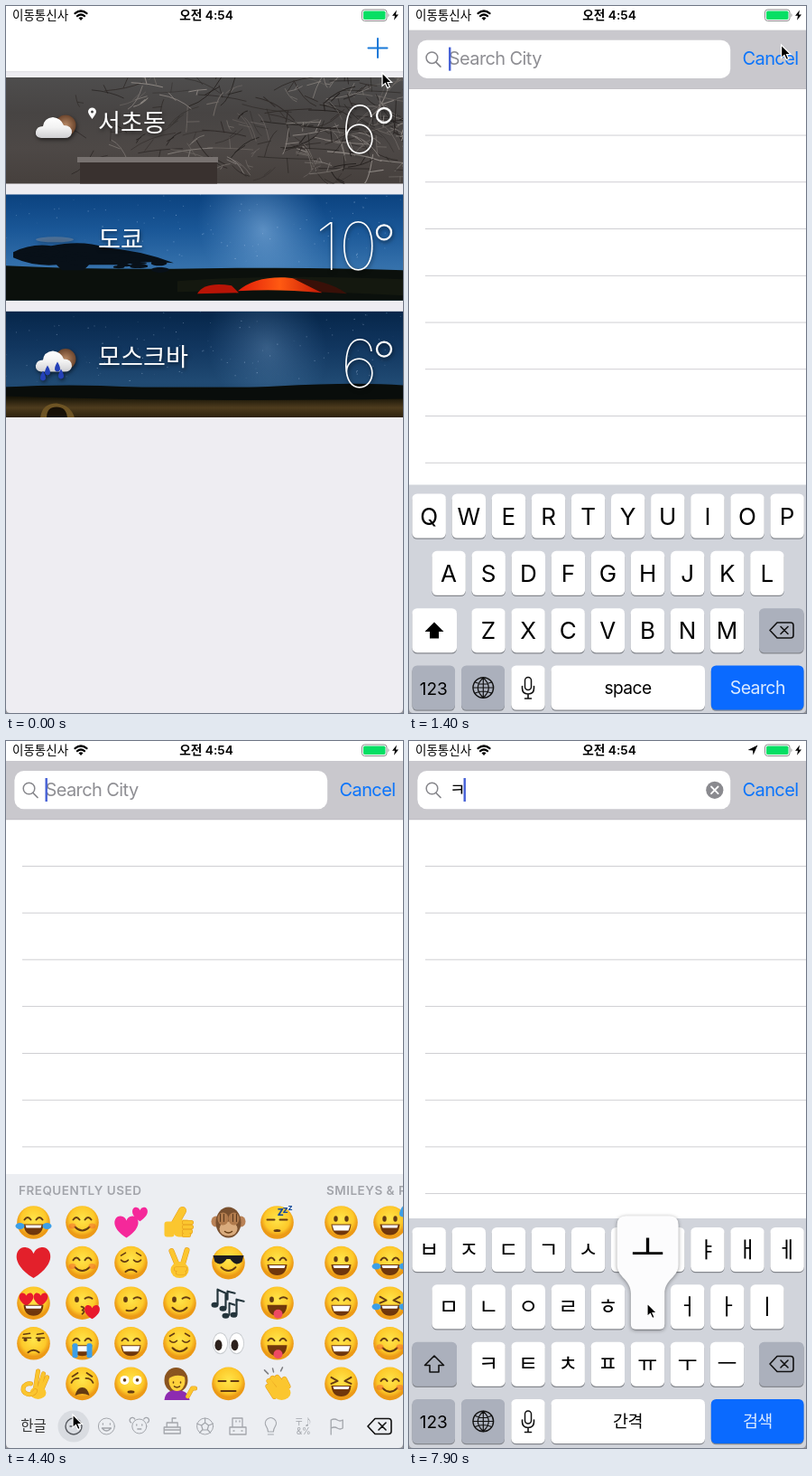
Write an HTML page that moves like this. It is 440 px wide and 782 px high and loops after 8000 ms.

```html
<!DOCTYPE html>
<html lang="ko">
<head>
<meta charset="utf-8">
<title>City search</title>
<style>
html, body { margin: 0; width: 100%; height: 100%; overflow: hidden; background: #fff; }
svg { display: block; width: 440px; height: 782px; font-family: Inter, 'Noto Sans CJK KR', 'Noto Sans CJK', sans-serif; }
.ko { font-family: 'Noto Sans CJK KR', 'Noto Sans CJK', sans-serif; }
.mid { text-anchor: middle; }
.tight { letter-spacing: -.6px; }
.line { fill: none; stroke-linecap: round; stroke-linejoin: round; }
.soft { filter: drop-shadow(1px 2px 2px rgba(0,0,0,.55)); }
</style>
</head>
<body>
<svg id="stage" viewBox="0 0 440 782" xmlns="http://www.w3.org/2000/svg"></svg>
<script>
let seed = 7;
const rnd = () => (seed = seed * 16807 % 2147483647) / 2147483647;
const times = (n, f) => Array.from({ length: n }, (_, i) => f(i)).join('');
const at = (x, y, s, k = 1) => `<g transform="translate(${x} ${y}) scale(${k})">${s}</g>`;
const text = (x, y, size, s, more = '') => `<text x="${x}" y="${y}" font-size="${size}" ${more}>${s}</text>`;
const rect = (x, y, w, h, fill, r = 0) => `<rect x="${x}" y="${y}" width="${w}" height="${h}" rx="${r}" fill="${fill}"/>`;
const oval = (x, y, rx, ry, fill) => `<ellipse cx="${x}" cy="${y}" rx="${rx}" ry="${ry}" fill="${fill}"/>`;
const shape = (d, fill) => `<path d="${d}" fill="${fill}"/>`;
const line = (d, color, w = 1) => `<path class="line" d="${d}" stroke="${color}" stroke-width="${w}"/>`;
const fade = (id, dir, ...stops) => `<linearGradient id="${id}" ${dir}>${stops.map((c, i) =>
  `<stop offset="${i / (stops.length - 1)}" stop-color="${c}"/>`).join('')}</linearGradient>`;
const down = 'x1="0" y1="0" x2="0" y2="1"';

const defs = `<defs>
${fade('mist', down, '#4e4d4d', '#474443', '#4d4846', '#46403d')}
${fade('dusk', down, '#0b427f', '#1a5797', '#3470ab', '#4a7ea6')}
${fade('night', down, '#06264a', '#11365f', '#204a73', '#1c3c58')}
${fade('field', down, '#0a0e0c', '#171407', '#4e3c1e', '#2c210d')}
${fade('tent', 'x1="0" y1="0" x2="1" y2="0"', '#e01a08', '#ff5a12', '#c41706')}
<radialGradient id="haze"><stop stop-color="#9cc6ee" stop-opacity=".5"/><stop offset="1" stop-color="#6fa5da" stop-opacity="0"/></radialGradient>
<radialGradient id="moon"><stop stop-color="#b98a66"/><stop offset="1" stop-color="#6b452d"/></radialGradient>
<radialGradient id="face" cy=".4"><stop stop-color="#ffe54a"/><stop offset=".75" stop-color="#fdc92a"/><stop offset="1" stop-color="#ec9a17"/></radialGradient>
${fade('cloud', down, '#fff', '#f2f2f2', '#cfcfd2')}
<clipPath id="card"><rect width="440" height="117.5"/></clipPath>
</defs>`;

// Weather list
const stars = times(120, () => oval(rnd() * 440, rnd() * 78, .6, .6, `rgba(210,230,255,${rnd() * .45})`));
const bark = ['#262220', '#312c2a', '#6f6965', '#8b8580'];
const twigs = times(170, i => {
  const x = 440 * (1 - rnd() * rnd()), y = rnd() * 110, a = rnd() * 6.3, len = 15 + rnd() * 50;
  const dx = Math.cos(a) * len, dy = Math.sin(a) * len * .6;
  return line(`M${x} ${y}q${dx * .4} ${dy * .8} ${dx} ${dy}m${-dx / 2} ${-dy * .4}l${dy * .5} ${dx * .25}`, bark[i % 4], .5 + rnd() * .6);
});
const leaves = times(50, () => {
  const x = rnd();
  return oval(14 + x * 160, 58 + x * 14 + rnd() * 14, 4 + rnd() * 7, 1 + rnd() * 2, '#081018');
});
const photos = [
  rect(0, 0, 440, 118, 'url(#mist)') + twigs + rect(82, 92, 152, 26, '#39312f') + rect(79, 88, 156, 6, '#787270'),
  rect(0, 0, 440, 118, 'url(#dusk)') + `<g transform="rotate(-25 290 45)">${oval(288, 38, 70, 85, 'url(#haze)')}</g>` + stars +
    shape('M0 79Q100 84 220 82T440 84V118H0Z', '#0b100c') + shape('M190 96Q300 88 440 94V112Q300 104 190 108Z', '#14180f') +
    shape('M8 64Q28 54 50 57Q85 50 110 59Q150 62 186 76Q150 73 130 78H92L86 84H62L56 78Q30 80 8 70Z', '#081018') + leaves +
    shape('M212 110Q220 96 250 101L258 109Z', '#b81406') + shape('M257 107Q275 91 309 92Q340 94 350 109Q300 104 257 107Z', 'url(#tent)') +
    shape('M318 93Q356 94 378 110L348 108Z', '#391008'),
  rect(0, 0, 440, 118, 'url(#night)') + `<g transform="rotate(-25 300 40)" opacity=".55">${oval(290, 36, 65, 75, 'url(#haze)')}</g>` + stars +
    rect(0, 84, 440, 34, 'url(#field)') + shape('M0 84Q70 80 140 84T300 83T440 82V97Q200 101 0 94Z', '#090d0b') +
    shape('M38 118Q40 102 56 102Q72 104 76 118Z', '#6e5424') + shape('M45 118Q45 106 56 106Q67 106 68 118Z', '#171006')
];
const cloud = oval(66, 53, 11.5, 11.5, 'url(#moon)') +
  shape('M39 67Q32 66 33 60Q34 54 41 54Q42 45 52 44Q61 45 64 53Q73 53 73 61Q72 67 65 67Z', 'url(#cloud)');
const drop = (x, y) => shape(`M${x} ${y}q-6 10 0 11q6 -1 0 -11z`, '#2441b8');
const icons = [cloud, oval(54, 50, 21, 3, 'rgba(150,150,155,.4)'),
  cloud + drop(46, 60) + drop(57, 56) + drop(41, 66) + drop(61, 64)];
const cities = [['서초동', '6'], ['도쿄', '10'], ['모스크바', '6']];
const list = rect(0, 0, 440, 782, '#eeedf2') + rect(0, 0, 440, 72.5, '#fff') + rect(0, 72.5, 440, .7, '#d5d4d9') +
  `<g id="plus">${line('M401.5 46.5h21M412 36v21', '#1878d8', 2)}</g>` +
  cities.map(([name, deg], i) => at(0, 79 + i * 129.3, `<g clip-path="url(#card)">${photos[i]}
    <g class="soft" fill="#fff">${icons[i]}${text(102, 60, 27.2, name, 'class="ko" font-weight="300"')}
    ${text(411, 84, 73, deg, 'text-anchor="end" font-weight="100" letter-spacing="-1"')}
    <circle cx="419" cy="42" r="8" fill="none" stroke="#fff" stroke-width="2.3"/></g></g>`)).join('') +
  shape('M95.500 125Q91 119 91 117A4.500 4.500 0 0 1 100 117Q100 119 95.500 125Z', '#fff') + oval(95.5, 117, 1.5, 1.5, '#444');

// Search sheet
const sheet = rect(0, -2, 440, 784, '#fff') + rect(0, 22, 440, 65, '#c9c8cd') + rect(0, 86.5, 440, .7, '#b9b8bd') +
  rect(9.4, 33, 346.8, 42.3, '#fff', 10.5) +
  `<g id="lens">${line('M30 57.5l5 5', '#86868b', 1.7)}<circle cx="25.500" cy="52.500" r="6.300" fill="none" stroke="#86868b" stroke-width="1.500"/></g>` +
  text(43.5, 60.5, 20, 'Search City', 'id="hint" class="tight" fill="#8e8e93"') +
  text(45, 60.5, 19, 'ㅋ', 'id="typed" class="ko" fill="#000"') +
  `<rect id="caret" x="43.500" y="41" width="2.400" height="26" fill="#4560d6"/>` +
  `<g id="clear">${oval(338.8, 54.3, 9.6, 9.6, '#8a8a8f')}${line('M335 50.500l7.600 7.600m0-7.600l-7.600 7.600', '#fff', 1.8)}</g>` +
  text(369.5, 60.5, 20, 'Cancel', 'class="tight" fill="#0a74fb"') +
  times(12, i => rect(18, 138 + i * 51.75, 422, .8, '#c4c3c8'));

// Letter keyboards
const rowY = [538, 601.3, 664.7, 728], rowX = [3.5, 25.4, 69.3], pitch = 44.1, keyW = 37.4;
const gray = '#abb0bc';
const key = (x, y, w, fill = '#fff', id = '') =>
  rect(x, y + 1.3, w, 49, '#85888e', 5.5) + `<rect ${id} x="${x}" y="${y}" width="${w}" height="49" rx="5.500" fill="${fill}"/>`;
const erase = (x, y) => line(`M${x - 13} ${y}l8-8.500h15q3 0 3 3v11q0 3-3 3h-15zM${x - 1} ${y - 4}l8 8m0-8l-8 8`, '#111', 1.6);
const shiftArrow = 'M28 680l-10.500 10.500h5.500v7.500h10v-7.500h5.500z';
const globe = at(82.3, 752.5, '<circle r="11.300" class="line" stroke="#111" stroke-width="1.400"/>' +
  line('M-11 0H11M0-11V11M0-11Q-12 0 0 11M0-11Q12 0 0 11M-9-6Q0-2 9-6M-9 6Q0 2 9 6', '#111', 1.2));
const mic = line('M125.500 751v2q0 6.500 6.500 6.500t6.500-6.500v-2M132 760v4.500m-3.500 0h7', '#111', 1.6) +
  '<rect x="128.500" y="741" width="7" height="14" rx="3.500" fill="none" stroke="#111" stroke-width="1.500"/>';
function board(rows, korean) {
  const font = korean ? 'class="ko mid"' : 'class="mid"', size = korean ? 24 : 26;
  const keys = rows.map((row, r) => [...row].map((c, i) => {
    const x = rowX[r] + i * pitch;
    return key(x, rowY[r], keyW) + text(x + keyW / 2, rowY[r] + (korean ? 32.5 : 34), size, c, font);
  }).join('')).join('');
  const [space, search] = korean ? ['간격', '검색'] : ['space', 'Search'];
  return rect(0, 528, 440, 254, '#d1d4db') + keys +
    key(3.5, rowY[2], 49.5, korean ? gray : '#fff') + (korean ? line(shiftArrow, '#111', 1.6) : shape(shiftArrow, '#000')) +
    key(388, rowY[2], 49.5, gray) + erase(413, 689) +
    key(3.5, 728, 47.5, gray) + text(27.3, 760, 19, '123', 'class="mid"') +
    key(58, 728, 48, gray, korean ? '' : 'id="globeKey"') + globe + key(113.3, 728, keyW) + mic +
    key(157.5, 728, 170.5) + text(242.5, 759, korean ? 18.5 : 19.2, space, 'class="mid tight"') +
    key(334.8, 728, 102.7, '#0a6aff') + text(386.3, 759, korean ? 18.5 : 19.5, search, 'class="mid tight" fill="#dcebff"');
}
const latin = ['QWERTYUIOP', 'ASDFGHJKL', 'ZXCVBNM'];
const hangul = ['ㅂㅈㄷㄱㅅㅛㅕㅑㅐㅔ', 'ㅁㄴㅇㄹㅎㅗㅓㅏㅣ', 'ㅋㅌㅊㅍㅠㅜㅡ'];
const bubble = (id, row, col) => `<g id="${id}">` + at(rowX[row] + col * pitch + keyW / 2, rowY[row],
  `<path style="filter:drop-shadow(0 1px 2px rgba(0,0,0,.4))" fill="#fcfcfd" d="M-34-66q0-10 10-10h48q10 0 10 10v44c0 14-15.300 16-15.300 32v34q0 5.500-5.500 5.500h-26.400q-5.500 0-5.500-5.500v-34c0-16-15.300-18-15.300-32z"/>` +
  text(0, -25, 41, hangul[row][col], 'class="ko mid"')) + '</g>';

// Emoji: a face is eyes + mouth + extras
const ink = '#643b12', skin = '#fbc62f', edge = '#e39a1c';
const heart = (c, x = 0, y = 0, k = 1) => at(x, y, shape('M0 17C-29-1-18-19-9-17Q-2-16 0-10Q2-16 9-17C18-19 29-1 0 17Z', c), k);
const eyes = {
  d: oval(-6, -4, 2.2, 3.2, ink) + oval(6, -4, 2.2, 3.2, ink),
  h: line('M-10-3q3.500-5 7 0M3-3q3.500-5 7 0', ink, 2),
  c: line('M-11-3q4 4 8 0M3-3q4 4 8 0M-11-8l5-3M11-8l-5-3', ink, 1.6),
  l: line('M-11-3h8M3-3h8', ink, 2),
  u: line('M-12-6h9M3-6h9M-11-10l7-1M4-10l7-1', ink, 1.6) + oval(-9, -4, 2, 2, ink) + oval(6, -4, 2, 2, ink),
  a: line('M-12-1q2-5 8-5M12-1q-2-5-8-5M-11-8l6-4M11-8l-6-4', ink, 1.8),
  x: line('M-11-7l7 4-7 3M11-7l-7 4 7 3', ink, 2),
  k: line('M3-5q4-3 8 0', ink, 2) + oval(-6, -4, 2.4, 3.2, ink),
  w: oval(-7, -4, 5, 5, '#fff') + oval(7, -4, 5, 5, '#fff') + oval(-7, -4, 1.8, 1.8, ink) + oval(7, -4, 1.8, 1.8, ink),
  s: shape('M-17-8H17L15-1Q8 5 2-4H-2Q-8 5-15-1Z', '#1c1c20'),
  H: heart('#e8192c', -8, -4, .42) + heart('#e8192c', 8, -4, .42)
};
const grin = shape('M-11 2H11Q10 14 0 14T-11 2Z', '#70370c');
const mouths = {
  S: line('M-8 5q8 8 16 0', ink, 2), f: line('M-8 8h16', ink, 2), n: line('M-6 10q6-5 12 0', ink, 2),
  O: grin + shape('M-9 3H9L8 6H-8Z', '#fff'), T: grin + shape('M-10 3H10L8 9H-8Z', '#fff'),
  m: line('M-5 8q7 2 11-3', ink, 2), g: oval(0, 9, 4, 1.6, ink), e: shape('M-8 13Q-6 4 0 4T8 13Q0 9-8 13Z', ink),
  t: grin + oval(1, 12, 5, 5, '#ee4a62'), p: line('M-1 4q5 1 1 4 4 1 0 4', ink, 1.8)
};
const blue = '#3c9fe8';
const extras = {
  j: oval(-15, 4, 5, 3.5, blue) + oval(15, 4, 5, 3.5, blue), o: rect(-11, 0, 6, 16, blue, 2) + rect(5, 0, 6, 16, blue, 2),
  b: oval(-11, 4, 4, 3, 'rgba(240,90,50,.45)') + oval(11, 4, 4, 3, 'rgba(240,90,50,.45)'),
  q: shape('M14-18q-7 11 0 12q7-1 0-12z', blue), v: heart('#e8192c', 11, 10, .45),
  z: [[0, -8, 13], [6, -11, 11], [12, -14, 9]].map(p => text(...p, 'z', 'fill="#174c9c" font-weight="700"')).join('')
};
const face = code => oval(0, 0, 18.3, 18.3, 'url(#face)') + eyes[code[0]] + mouths[code[1]] + [...code.slice(2)].map(c => extras[c]).join('');
const finger = (d, w = 7) => line(d, edge, w + 1) + line(d, skin, w);
const things = {
  love: heart('#e3202b'),
  pair: heart('#f5289a', -5, 5, .7) + heart('#f5289a', 10, -9, .45),
  thumb: finger('M-5 1L3-13', 8) + rect(-7, -3, 21, 19, skin, 6) + finger('M5 0H13M5 5H13M5 10H12M5 14H10', 4) + rect(-17, -1, 11, 17, skin, 3),
  peace: finger('M-2 4L-9-13M3 3L8-14', 5) + oval(0, 8, 10, 9, skin) + finger('M-4 7H6M-2 11H5', 4),
  ok: finger('M2 5L5-14M6 6L11-11M9 7L15-7', 4) + oval(5, 10, 9, 7, skin) + line('M2 8A7 6 0 1 1-3 0', edge, 5) + line('M2 8A7 6 0 1 1-3 0', skin, 4),
  clap: finger('M-10 3L-3 14M-9-3L0 9M-5-6L5 6M0-7L9 4M8-5L12 3', 5) + oval(5, 10, 10, 8, skin) + line('M-10-11l-4-4M-4-13l-1-4M4-14l2-4', '#7d7d82', 1.5),
  ape: oval(-14, -1, 5, 6, '#b98257') + oval(14, -1, 5, 6, '#b98257') + oval(0, 0, 14, 17, '#79502f') + oval(0, 7, 10, 8, '#d9ab7d') +
    oval(-6, -4, 6, 7, '#b07a4c') + oval(6, -4, 6, 7, '#b07a4c') + line('M-9-9v8M-5-9v8M5-9v8M9-9v8', '#59391f', 1) + line('M-4 10q4 3 8 0', ink, 1.5),
  notes: line('M-12 1V-15l9 4V5M-1-4V-13l8 2M9 12V-4l8 2', '#23343b', 2.2) + oval(-15, 2, 4, 3, '#23343b') + oval(-6, 6, 4, 3, '#23343b') + oval(6, 13, 4, 3, '#23343b') + oval(-3, 14, 4, 3, '#23343b') + line('M1 13V0l6 2', '#23343b', 2),
  look: [-9, 9].map(x => oval(x, 0, 8.5, 12, '#c9ccd0') + oval(x, 0, 7.6, 11, '#fff') + oval(x - 2, 2, 4, 6, '#2c211c')).join(''),
  girl: oval(-4, -4, 13, 14, '#8a5420') + shape('M-17 18Q-16 7-4 7Q10 7 11 18Z', '#8d2bb0') + oval(-3, -3, 9, 11, '#ffd23c') +
    shape('M-13-5Q-9-16 0-15Q7-13 7-7Q-4-12-13-5Z', '#8a5420') + finger('M9 14L14 5H17', 4) + line('M-7-2v1M1-2v1M-6 3q3 2 6 0', ink, 1.5)
};
const grid = `hOj hSb pair thumb ape lgz dT dOq
love hSb cn peace sS hO dO hOj
HO kpv km kS notes kt hT xOj
un hTo hT cS look ht hT hSb
ok ae wg girl lf clap xO hSb`.split('\n').map(r => r.split(' '));
const colX = i => i < 6 ? 30.5 + 54 * i : 371.5 + 54 * (i - 6);
const pale = '#a2a5ab';
const tabs = [
  '<circle r="9" class="line" stroke="#55585e" stroke-width="1.400"/>' + line('M0-5V0H-4', '#55585e', 1.4),
  '<circle r="9" class="line" stroke="#a2a5ab"/>' + line('M-4-3v1M4-3v1M-5 2q5 6 10 0z', pale, 1.3),
  '<circle r="8" class="line" stroke="#a2a5ab"/>' + line('M-9-4a3 3 0 1 1 4-4M9-4a3 3 0 1 0-4-4M-3-2v1M3-2v1M-2 3h4', pale, 1.3),
  line('M-9 8V1H9V8ZM-9 4H9M-6 1V-4H6V1M0-4V-9h4', pale, 1.3),
  '<circle r="9" class="line" stroke="#a2a5ab"/>' + line('M0-4l4 3-1.500 5h-5l-1.500-5zM0-9v5M4-1l5-2M3 4l3 3M-3 4l-3 3M-4-1l-5-2', pale, 1.2),
  line('M-6 0V-9H5V0M-9 9V1H9V9ZM-5 5h1M4 5h1M-2-6v1M2-6v1', pale, 1.3),
  line('M-3 6Q-3 3-5 0A6 6 0 1 1 5 0Q3 3 3 6ZM-3 9H3', pale, 1.2),
  text(0, -1, 10, '〒♪', `class="ko mid" fill="${pale}"`) + text(0, 9, 10, '&amp;%', `class="mid" fill="${pale}"`),
  line('M-6 9V-7Q-2-9 1-7T7-7V2Q4 4 1 2T-6 2', pale, 1.3)
];
const label = 'font-weight="600" letter-spacing=".5" fill="#a2a4aa"';
const emoji = rect(0, 479, 440, 303, '#eceef2') + text(14, 501.8, 13.5, 'FREQUENTLY USED', label) + text(355, 501.8, 13.5, 'SMILEYS &amp; PEOPLE', label) +
  grid.map((row, r) => row.map((c, i) => at(colX(i), 532.5 + 44.6 * r, things[c] || face(c))).join('')).join('') +
  text(30.5, 763, 15.5, '한글', 'class="ko mid" fill="#333"') + oval(75, 758, 17.5, 17.5, '#d9dce1') +
  tabs.map((s, i) => at(75 + 36.4 * i, 758, s)).join('') + erase(414, 758);

// Status bar and pointer
const status = rect(0, 0, 440, 22, '#fff') + text(7, 14.5, 13.5, '이동통신사', 'class="ko"') +
  line('M76.500 8.200q6.500-5.400 13 0M79 11.200q4-3.400 8 0', '#000', 2.2) + shape('M83 16l-2.500-2.800q2.500-1.700 5 0z', '#000') +
  text(222, 14.5, 13.7, '오전 4:54', 'class="mid" font-weight="600"') +
  `<g id="locate">${shape('M386.500 4.500L381.500 15.500L381 10.500L375.500 10Z', '#000')}</g>` +
  '<rect x="394.500" y="4" width="27.500" height="12.500" rx="3" fill="none" stroke="#8b8b8b"/>' + rect(396, 5.6, 24.5, 9.3, '#06df64', 1.6) +
  shape('M423.500 8q2 2 0 4.500z', '#8b8b8b') + shape('M433 4.500l-5 6.200h3l-1 5 5-6.300h-3z', '#000');
const arrow = '<path d="M0 0V14.500L3.400 11.400L5.700 16.600L8.200 15.500L6 10.500H10.500Z" fill="#000" stroke="#fff" stroke-width="1.200"/>';
const corners = shape('M0 777q0 5 5 5h-5zM440 777q0 5-5 5h5z', '#9a9a9e');

const group = (id, s) => `<g id="${id}">${s}</g>`;
document.getElementById('stage').innerHTML = defs + list + group('sheet', sheet) + status +
  group('latin', board(latin)) + group('emoji', emoji) + group('hangul', board(hangul, true)) +
  bubble('popK', 2, 0) + bubble('popO', 1, 5) + corners + `<g id="mouse">${arrow}</g>`;

const $ = id => document.getElementById(id);
const show = (id, on) => { $(id).style.display = on ? '' : 'none'; };
const move = (id, x, y) => $(id).setAttribute('transform', `translate(${x} ${y})`);
const clamp = v => Math.max(0, Math.min(1, v));
const LOOP = 8000, OPEN = 1015, EMOJI = 4000, HANGUL = 5100, TYPED = 6600;
const path = [[0, 417, 74], [300, 417, 74], [800, 412, 43], [1900, 413, 43], [2700, 61, 711], [2800, 59, 715],
  [3100, 76, 744], [3500, 74, 745], [4600, 74, 745], [5000, 30, 752], [5600, 30, 752], [6100, 82, 692],
  [7300, 82, 692], [7700, 264, 622], [LOOP, 264, 622]];

function pointer(t) {
  const i = path.findIndex(p => p[0] > t), [t0, x0, y0] = path[i - 1], [t1, x1, y1] = path[i];
  const u = (t - t0) / (t1 - t0), e = u * u * (3 - 2 * u);
  move('mouse', x0 + (x1 - x0) * e, y0 + (y1 - y0) * e);
}
function blink(t) {
  const p = t % 1000;
  return t > 6500 || t < 1400 ? 1 : p < 600 ? clamp((p - 190) / 200) : clamp((900 - p) / 200);
}
function draw(t) {
  // critically damped spring: share of the slide still to go
  const w = Math.max(0, t - OPEN) * .0188, left = (1 + w) * Math.exp(-w), typed = t >= TYPED;
  show('sheet', t >= OPEN);
  move('sheet', 0, 782 * left);
  show('latin', t >= OPEN && t < EMOJI);
  move('latin', 0, 254 * left);
  show('emoji', t >= EMOJI && t < HANGUL);
  show('hangul', t >= HANGUL);
  $('plus').style.opacity = t >= 900 && t < 1200 ? .8 : 1;
  $('globeKey').setAttribute('fill', t >= 3800 ? '#fff' : gray);
  move('lens', -7 - 7 * (2 * left - 1), 10 * left);
  move('hint', 45 * left, 0);
  $('hint').textContent = left > .3 ? 'Search' : 'Search City';
  show('hint', !typed);
  show('typed', typed);
  show('clear', typed);
  show('locate', t >= 6800);
  move('caret', typed ? 17 : 90 * left, 0);
  $('caret').style.opacity = blink(t);
  show('popK', t >= 6500 && t < 6700);
  show('popO', t >= 7800);
  pointer(t);
}
function tick() {
  draw(Math.floor(performance.now() % LOOP / 100) * 100);
  requestAnimationFrame(tick);
}
tick();
</script>
</body>
</html>
```
